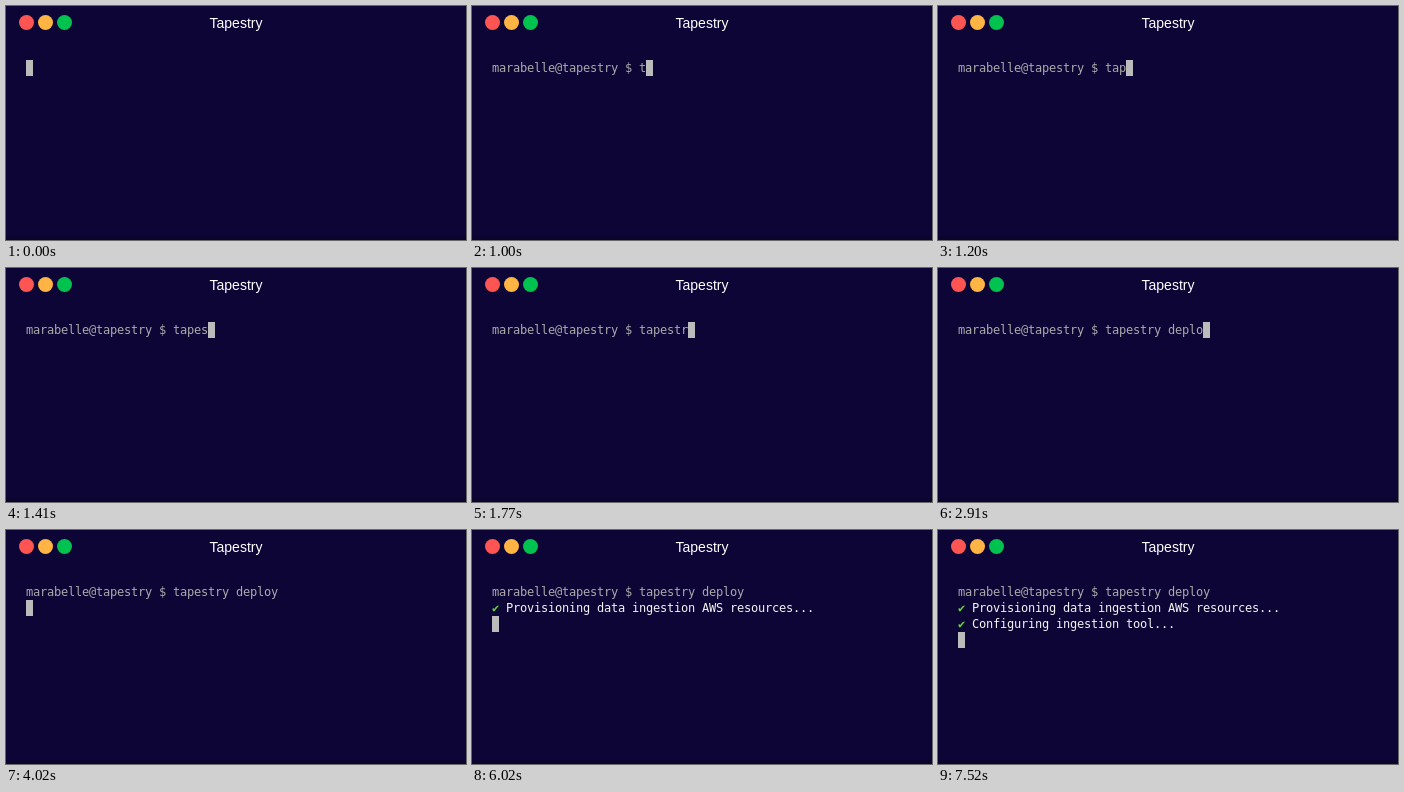
These frames come from a looping animation (460x234 px, 8 s). An HTML page with a canvas:

```html
<!DOCTYPE html>
<html lang="en">
<head>
<meta charset="utf-8">
<title>Terminal</title>
<style>
  html, body { margin: 0; width: 100%; height: 100%; overflow: hidden; background: #0c0536; }
  canvas { display: block; width: 460px; height: 234px; }
</style>
</head>
<body>
<canvas id="stage" width="460" height="234"></canvas>
<script>
const ctx = document.getElementById('stage').getContext('2d', { alpha: false });

const LOOP = 8000;
const CELL = { left: 20, top: 54, width: 7, height: 16 };
const MONO = '12px "DejaVu Sans Mono", monospace';
const GREY = '#acacac', WHITE = '#f5f5f5', GREEN = '#62dc2c', CURSOR = '#bbbbbb';

const PROMPT = 'marabelle@tapestry $ ';
const COMMAND = 'tapestry deploy';
const KEY_TIMES = [1000, 1060, 1200, 1260, 1410, 1510, 1670, 1780, 1880,
                   2430, 2480, 2670, 2710, 2910, 3020];
const ENTER_TIME = 4020;
const OUTPUT = [
  { at: 6020, text: 'Provisioning data ingestion AWS resources...' },
  { at: 7520, text: 'Configuring ingestion tool...' }
];

function dot(x, color) {
  ctx.fillStyle = color;
  ctx.beginPath();
  ctx.arc(x, 16.5, 7.5, 0, Math.PI * 2);
  ctx.fill();
}

function drawWindow() {
  ctx.fillStyle = '#0c0536';
  ctx.fillRect(0, 0, 460, 234);
  ctx.fillStyle = '#0a042f';
  ctx.fillRect(0, 230, 460, 4);

  dot(20.5, '#ff5552');
  dot(39.5, '#ffb444');
  dot(58.5, '#00c24e');

  ctx.font = '14px "Liberation Sans", Arial, sans-serif';
  ctx.textAlign = 'center';
  ctx.fillStyle = '#ffffff';
  ctx.fillText('Tapestry', 230, 22);
}

// Each character sits in its own terminal cell.
function print(text, column, row, color) {
  ctx.font = MONO;
  ctx.textAlign = 'left';
  ctx.fillStyle = color;
  const baseline = CELL.top + row * CELL.height + 12;
  [...text].forEach((char, i) =>
    ctx.fillText(char, CELL.left + (column + i) * CELL.width, baseline));
}

function drawCursor(column, row) {
  ctx.fillStyle = CURSOR;
  ctx.fillRect(CELL.left + column * CELL.width, CELL.top + row * CELL.height,
               CELL.width, CELL.height);
}

function draw(time) {
  drawWindow();

  const typed = KEY_TIMES.filter(at => time >= at).length;
  const line = typed ? PROMPT + COMMAND.slice(0, typed) : '';
  print(line, 0, 0, GREY);

  if (time < ENTER_TIME) {
    drawCursor(line.length, 0);
    return;
  }

  const shown = OUTPUT.filter(({ at }) => time >= at);
  shown.forEach(({ text }, i) => {
    print('✔', 0, i + 1, GREEN);
    print(text, 2, i + 1, WHITE);
  });
  drawCursor(0, shown.length + 1);
}

const start = performance.now();
function frame() {
  draw((performance.now() - start) % LOOP);
  requestAnimationFrame(frame);
}
frame();
</script>
</body>
</html>
```
